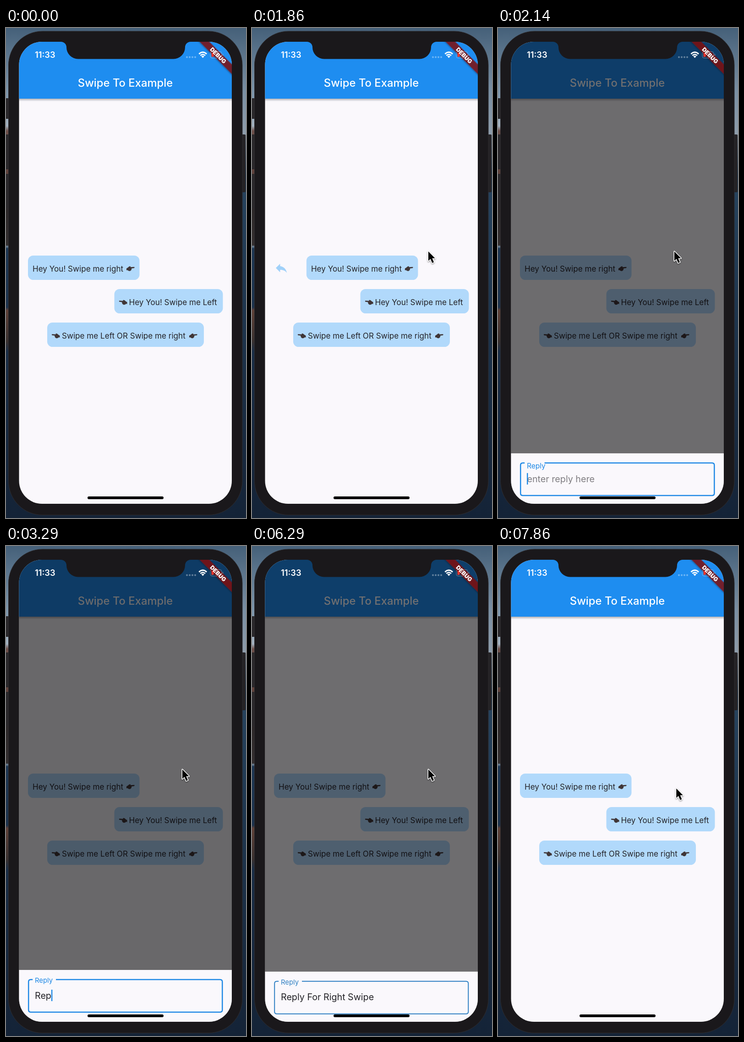
These frames come from a looping animation (524x1068 px, 8000 ms). An HTML page:

```html
<!DOCTYPE html>
<html lang="en">
<head>
<meta charset="utf-8">
<title>Swipe To Example</title>
<style>
  html, body { margin: 0; width: 100%; height: 100%; overflow: hidden; background: #14253b; }
  svg { display: block; width: 524px; height: 1068px; }
  text { font-family: Inter, Roboto, sans-serif; white-space: pre; }
  .bubble rect { fill: #b1d9fb; }
  .bubble text { font-size: 17.1px; fill: #242328; }
  .entry { font-size: 19.7px; }
</style>
</head>
<body>
<svg viewBox="0 0 524 1068">
  <defs>
    <linearGradient id="left" x2="0" y2="1">
      <stop offset="0" stop-color="#456079"/>
      <stop offset=".14" stop-color="#8199ae"/>
      <stop offset=".2" stop-color="#a3b2c0"/>
      <stop offset=".21" stop-color="#6d4f49"/>
      <stop offset=".3" stop-color="#5d403a"/>
      <stop offset=".37" stop-color="#2b2728"/>
      <stop offset=".443" stop-color="#332e2f"/>
      <stop offset=".446" stop-color="#70869b"/>
      <stop offset=".45" stop-color="#1d3652"/>
      <stop offset=".57" stop-color="#1c324c"/>
      <stop offset=".576" stop-color="#5e4037"/>
      <stop offset=".64" stop-color="#38302f"/>
      <stop offset=".66" stop-color="#192d46"/>
      <stop offset="1" stop-color="#142337"/>
    </linearGradient>
    <linearGradient id="right" x2="0" y2="1">
      <stop offset="0" stop-color="#456079"/>
      <stop offset=".13" stop-color="#7a8fa3"/>
      <stop offset=".22" stop-color="#8f9dab"/>
      <stop offset=".3" stop-color="#27445f"/>
      <stop offset=".6" stop-color="#1d344c"/>
      <stop offset="1" stop-color="#142337"/>
    </linearGradient>
    <linearGradient id="barShadow" x2="0" y2="1">
      <stop offset="0" stop-opacity=".28"/>
      <stop offset="1" stop-opacity="0"/>
    </linearGradient>
    <clipPath id="screen"><rect x="28.5" y="30" width="464.5" height="1007" rx="50"/></clipPath>
    <filter id="soft" x="-50%" y="-50%" width="200%" height="200%">
      <feDropShadow dx="0" dy="1.5" stdDeviation="1.5" flood-opacity=".45"/>
    </filter>
    <path id="hand" d="M0 5.500L3 3.800Q5.500 .8 8 .8Q9.500 1.200 9 2.800L16.800 2.300Q18.600 3.300 16.800 4.700L11 5.400Q12 6.800 10.800 7.600Q11.200 9.400 9.600 9.800Q9 11.400 7 11.200Q3.800 11.200 2.600 9.300L0 9.500Z" fill="#403637"/>
  </defs>

  <rect width="262" height="1068" fill="url(#left)"/>
  <rect x="262" width="262" height="1068" fill="url(#right)"/>
  <path d="M0 153h6v45h-6zM0 232h6v76h-6zM0 318h6v75h-6z" fill="#29272a"/>
  <rect x="513" y="232" width="10" height="126" rx="2" fill="#242225"/>
  <rect x="5.500" y="7" width="510.500" height="1054.500" rx="74" fill="#1a181b" stroke="#2f2d30"/>

  <g clip-path="url(#screen)">
    <rect x="28" y="30" width="466" height="1008" fill="#faf8fc"/>
    <rect x="28" y="154" width="466" height="6" fill="url(#barShadow)"/>
    <rect x="28" y="30" width="466" height="124" fill="#1e8df0"/>
    <text x="260.5" y="128" text-anchor="middle" font-size="23.8" font-weight="500" fill="#fff">Swipe To Example</text>

    <path id="replyIcon" transform="translate(48 507) scale(1.34)" fill="#90caf9" d="M10 9V5l-7 7 7 7v-4.1c5 0 8.5 1.6 11 5.1-1-5-4-10-11-11z"/>
    <g class="bubble" id="first">
      <rect x="48" y="496" width="243.5" height="53" rx="11.5"/>
      <text x="58" y="531">Hey You! Swipe me right</text>
      <use href="#hand" x="263" y="518.5"/>
    </g>
    <g class="bubble">
      <rect x="236.5" y="569" width="237" height="53" rx="11.5"/>
      <text x="268.5" y="604">Hey You! Swipe me Left</text>
      <use href="#hand" transform="translate(264.5 592) scale(-1 1)"/>
    </g>
    <g class="bubble">
      <rect x="90" y="642" width="342" height="53" rx="11.5"/>
      <text x="122" y="677">Swipe me Left OR Swipe me right</text>
      <use href="#hand" transform="translate(117.5 665) scale(-1 1)"/>
      <use href="#hand" x="400" y="665"/>
    </g>

    <g id="snack">
      <rect x="28" y="939" width="466" height="99" fill="#e0312d"/>
      <text x="260.5" y="973" text-anchor="middle" font-size="17.1" fill="#fff">Reply For Right Swipe</text>
    </g>

    <rect id="scrim" x="28" y="30" width="466" height="1008" fill="#030002"/>

    <g id="sheet">
      <rect x="28" width="466" height="130" fill="#faf8fc"/>
      <path id="border" fill="none"/>
      <text id="hint" class="entry" x="63.5" y="62.5" fill="#6b696d">enter reply here</text>
      <text id="typed" class="entry" x="63" y="62.5" fill="#242328"></text>
      <rect id="caret" y="43" width="2.4" height="25" fill="#1e88e5"/>
      <text id="label" font-size="14.8" fill="#1e88e5">Reply</text>
    </g>

    <path d="M120 29V30A12 12 0 0 1 132 42A25.500 25.500 0 0 0 157.500 67.500H365.500A25.500 25.500 0 0 0 391 42A12 12 0 0 1 403 30V29Z" fill="#1a181b"/>
    <g transform="translate(493 30) rotate(45)">
      <rect x="-80" y="34.7" width="160" height="14.9" fill="#820f14" fill-opacity=".8" filter="url(#soft)"/>
    </g>
    <g fill="none" stroke="#fff" stroke-opacity=".35">
      <rect x="446" y="51.5" width="25" height="14" rx="4"/>
      <path d="M473.5 56.5v4" stroke-width="1.5"/>
    </g>
    <rect x="448.5" y="54" width="5" height="9" rx="1.5" fill="#e8382f"/>
    <text transform="translate(493 30) rotate(45)" y="46.8" text-anchor="middle" font-size="12.6" font-weight="900" fill="#fff">DEBUG</text>
    <text x="63" y="65" font-size="18.3" font-weight="600" fill="#fff">11:33</text>
    <path d="M395 63.5h.1m5.9 0h.1m5.9 0h.1m5.9 0h.1" stroke="#fff" stroke-opacity=".35" stroke-width="4" stroke-linecap="round"/>
    <g fill="none" stroke="#fff" stroke-width="2.8">
      <path d="M421.3 56.6Q429.7 49 438.1 56.6M424.4 60Q429.7 55.2 435 60"/>
      <path d="M426.4 61.7Q429.7 59.2 433 61.7L429.7 65.2Z" fill="#fff" stroke="none"/>
    </g>
    <rect id="home" x="178" y="1021" width="166" height="6" rx="3"/>
  </g>

  <path id="pointer" d="M0 0V20.500L4.600 16.300L8.400 25L12 23.400L8.400 14.800H14.500Z" stroke="#fff" stroke-width="3" stroke-linejoin="round" paint-order="stroke" filter="url(#soft)"/>
</svg>

<script>
const LOOP = 8000, FPS = 7, REPLY = 'Reply For Right Swipe';
const el = Object.fromEntries([...document.querySelectorAll('[id]')].map(n => [n.id, n]));
const set = (node, attrs) => { for (const k in attrs) node.setAttribute(k, attrs[k]); };
const ramp = (t, start, length) => Math.min(1, Math.max(0, (t - start) / length));
const easeOut = (u, power) => 1 - (1 - u) ** power;
const shift = (x, y) => `translate(${x} ${y})`;

// time, x, y
const pointerPath = [
  [420, 330, 1050], [1000, 180, 535], [1300, 165, 522], [1640, 165, 520],
  [1845, 385, 487], [7000, 385, 487], [7700, 389.3, 528.5]
];

function pointerAt(t) {
  let i = 1;
  while (i < pointerPath.length - 1 && t > pointerPath[i][0]) i++;
  const [t0, x0, y0] = pointerPath[i - 1], [t1, x1, y1] = pointerPath[i];
  const u = ramp(t, t0, t1 - t0), e = u * u * (3 - 2 * u);
  return [x0 + (x1 - x0) * e, y0 + (y1 - y0) * e];
}

function drawSwipe(t) {
  const slide = easeOut(ramp(t, 1647, 150) - ramp(t, 1797, 150), 2);
  set(el.first, { transform: shift(84.5 * slide, 0) });
  set(el.replyIcon, { opacity: slide });
}

function drawSheet(t) {
  const open = easeOut(ramp(t, 1947, 250), 2.36) - ramp(t, 6255, 170) ** 2;
  const float = ramp(t, 1972, 200);
  const count = Math.floor(ramp(t, 2880, 128.5 * REPLY.length) * REPLY.length);
  const focused = t < 6200;
  const color = focused ? '#1e88e5' : '#2f80c3';
  set(el.scrim, { opacity: 0.58 * open });
  set(el.sheet, { transform: shift(0, 1037 - 113 * open) });
  set(el.border, {
    d: `M${58 + 51 * float} 21H467.3q5 0 5 5V87q0 5 -5 5H54.2q-5 0 -5 -5V26q0 -5 5 -5h4`,
    stroke: color, 'stroke-width': focused ? 2.5 : 2
  });
  set(el.label, {
    transform: `${shift(63, 28 + 34.5 * (1 - float))} scale(${1.33 - 0.33 * float})`,
    fill: color
  });
  set(el.hint, { opacity: count ? 0 : float });
  el.typed.textContent = REPLY.slice(0, count);
  const typing = t > 2880 && t < 5650;
  const lit = typing || (t - 2000) % 1000 < 500;
  set(el.caret, {
    x: 63 + (count ? el.typed.getComputedTextLength() : 0),
    opacity: focused && lit ? 1 : 0
  });
}

function drawSnack(t) {
  const shown = t > 6400 ? 1 - ramp(t, 7130, 220) : 0;
  set(el.snack, { transform: shift(0, 99 * (1 - shown)) });
  set(el.home, { fill: shown ? '#2d2729' : '#000' });
}

function draw() {
  // The picture advances in steps of a seventh of a second.
  const step = Math.floor((performance.now() % LOOP + 5) * FPS / 1000);
  const t = step % (LOOP * FPS / 1000) * 1000 / FPS;
  drawSwipe(t);
  drawSheet(t);
  drawSnack(t);
  set(el.pointer, { transform: shift(...pointerAt(t)), opacity: t < 420 ? 0 : 1 });
  requestAnimationFrame(draw);
}
draw();
</script>
</body>
</html>
```
